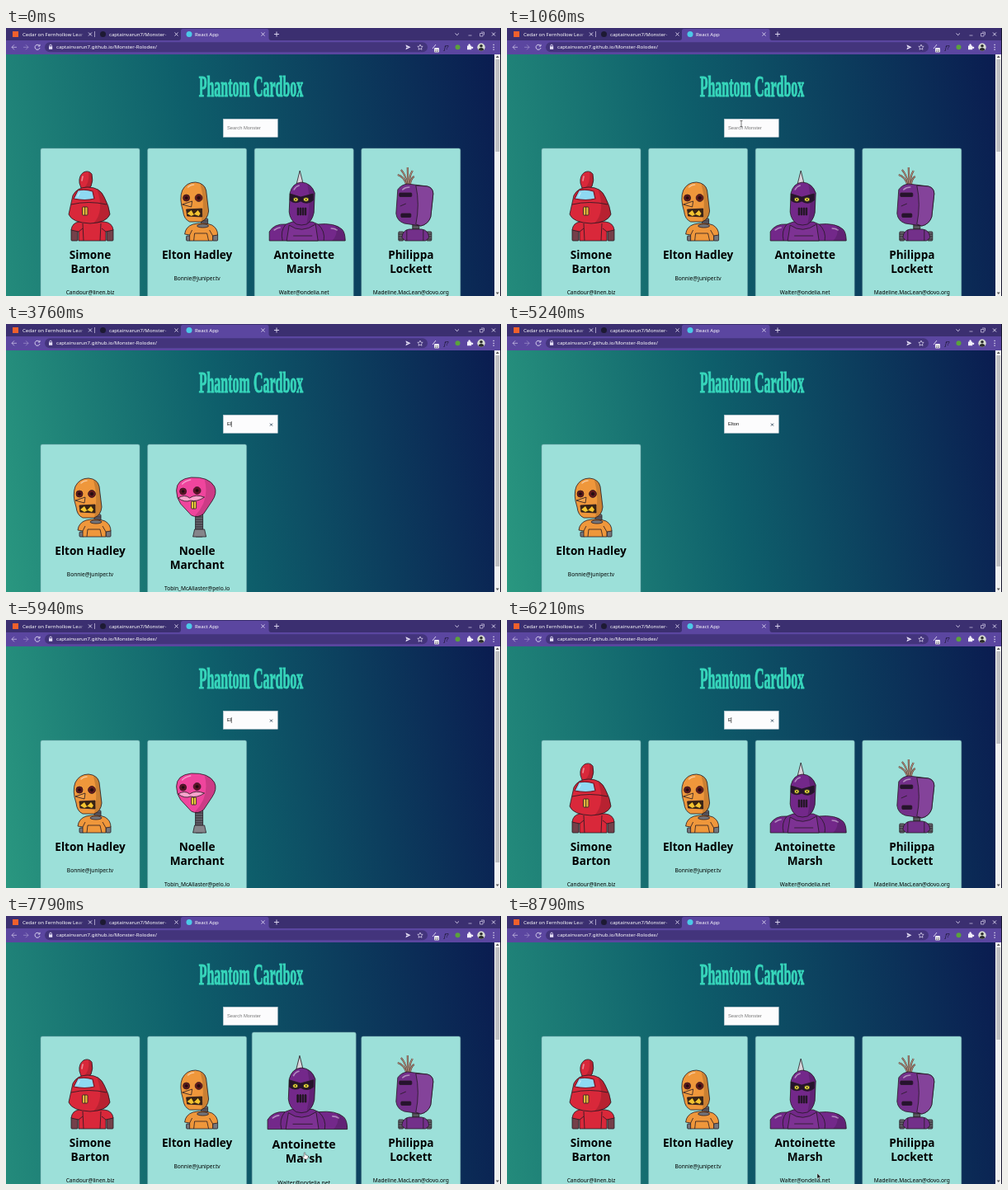
An HTML page that plays this animation: 600x325 px, repeating every 8850 ms.

```html
<!DOCTYPE html>
<html lang="en">
<head>
<meta charset="utf-8">
<title>React App</title>
<style>
html, body { margin: 0; width: 100%; height: 100%; overflow: hidden; background: #0a1c50; }
body { position: relative; }
#page { position: absolute; left: 0; top: 32px; width: 592px;
  background: linear-gradient(80deg, #2a9880, #0e5f6b 46%, #0a1c50); }
svg { position: absolute; left: 0; top: 0; }
text { font-family: "Noto Sans", "Open Sans", sans-serif; white-space: pre; }
.ui text { font-size: 6.1px; fill: #fff; }
.line { fill: none; stroke: #e4def5; stroke-width: .9; }
.field text { font: 5.8px "Liberation Sans", Arial, sans-serif; }
.title { font: bold 16px "Liberation Serif", serif; fill: #37d6bb; stroke: #37d6bb; stroke-width: .5; }
.card text { text-anchor: middle; }
.name { font-weight: bold; font-size: 13.6px; }
.mail { font-size: 6.6px; }
.bot { stroke: #241a22; stroke-width: .8; stroke-linejoin: round; }
</style>
</head>
<body>
<div id="page"></div>
<svg width="600" height="325" viewBox="0 0 600 325">
  <defs>
    <linearGradient id="fade"><stop offset="0" stop-color="#3b2f70" stop-opacity="0"/><stop offset="1" stop-color="#3b2f70"/></linearGradient>
  </defs>

  <text class="title" text-anchor="middle" transform="translate(297 83) scale(1 2.2)">Phantom Cardbox</text>
  <g class="field">
    <rect x="263.3" y="110.3" width="66" height="22" fill="#fcfcfd" stroke="#b9c6d0" stroke-width=".5"/>
    <text id="hint" x="268" y="123.3" fill="#777">Search Monster</text>
    <text id="typed" x="268" y="123.3" fill="#111"></text>
    <path id="clear" d="M320 120.6l3 3m0-3l-3 3" stroke="#2c4358" stroke-width=".9"/>
    <rect id="caret" y="118" width=".6" height="7" fill="#111"/>
  </g>
  <g id="cards"></g>

  <rect x="592" y="32" width="7" height="293" fill="#f1f1f1"/>
  <rect id="thumb" x="593.2" y="38" width="5" fill="#c0c0c2"/>
  <path d="M593.700 36l2-2.400 2 2.400zM593.700 320.500l2 2.400 2-2.400z" fill="#555"/>

  <g class="ui">
    <rect width="600" height="16" fill="#3b2f70"/>
    <rect y="15" width="600" height="17" fill="#5b46a0"/>
    <path d="M209 15q3 0 3-3V3.500q0-2.500 2.500-2.500H316q2.500 0 2.500 2.500V12q0 3 3 3z" fill="#5b46a0"/>
    <rect x="8" y="4" width="7" height="7" fill="#f0602c"/>
    <circle cx="117.500" cy="7.500" r="3.500" fill="#1d1a33"/>
    <circle cx="222" cy="7.500" r="3.500" fill="#4cc9e8"/>
    <text x="20" y="9.700">Cedar on Fernhollow Lear</text>
    <text x="125" y="9.700">captainvarun7/Monster-</text>
    <rect x="86" y="2" width="10" height="12" fill="url(#fade)"/>
    <rect x="191" y="2" width="10" height="12" fill="url(#fade)"/>
    <rect x="96" y="2" width="14" height="12" fill="#3b2f70"/>
    <rect x="201" y="2" width="9" height="12" fill="#3b2f70"/>
    <text x="229" y="9.700">React App</text>
    <path class="line" d="M100 5.500l4 4m0-4l-4 4M204.500 5.500l4 4m0-4l-4 4M309.500 5.500l4 4m0-4l-4 4M325 7.500h6m-3-3v6M544.500 6.500l2.200 2.200 2.200-2.200M589 5.500l4 4m0-4l-4 4"/>
    <path class="line" opacity=".7" d="M560.500 9h4M574.500 6.500h3.500v3.500h-3.500zM576 5h3.500v3.500M107.500 4v7"/>
    <rect x="47" y="17.300" width="464" height="12" rx="6" fill="#43347c"/>
    <path class="line" opacity=".7" d="M13 23.300H7m3-3l-3 3 3 3"/>
    <path class="line" opacity=".4" d="M21 23.300h6m-3-3l3 3-3 3"/>
    <path class="line" d="M40.500 21.500a3 3 0 1 0 .5 2.500M41 19.800v2.200h-2.200"/>
    <path class="line" d="M52.800 22.500v-1a1.300 1.300 0 0 1 2.600 0v1"/>
    <rect x="52" y="22.300" width="4.200" height="3.500" fill="#e4def5"/>
    <text x="61" y="25.400">captainvarun7.github.io/Monster-Rolodex/</text>
    <path d="M484.500 20.300l6 3-6 3 .6-2.500 3-.5-3-.5z" fill="#e4def5"/>
    <path class="line" style="stroke-width:.7" d="M502 20l.9 2.200 2.300.2-1.700 1.600.5 2.300-2-1.200-2 1.200.5-2.300-1.700-1.600 2.300-.2z"/>
    <path class="line" d="M517 25l4-5"/>
    <rect x="519" y="24" width="6" height="5.500" rx="1" fill="#ece9f5"/>
    <text x="519.600" y="28.500" style="font-size:4.200px;fill:#333">22</text>
    <text x="531" y="25.800" style="font-style:italic;font-size:7px;fill:#17132c">f?</text>
    <circle cx="547.500" cy="23.300" r="3" fill="#5aa23c"/>
    <path d="M559 21.500h1.600a1.300 1.300 0 1 1 2 0h1.600v1.500a1.200 1.200 0 1 1 0 1.600v1.700H559z" fill="#f4f1fc"/>
    <circle cx="576" cy="23.300" r="4.700" fill="#d8ddd2"/>
    <path d="M572.800 26.500q0-2.600 3.200-2.600t3.200 2.600q-3.200 2.400-6.400 0" fill="#2a2b2c"/>
    <circle cx="576" cy="21.800" r="1.800" fill="#2a2b2c"/>
    <path d="M590.500 19.800h1.200v1.200h-1.200zm0 2.900h1.200v1.200h-1.200zm0 2.900h1.200v1.200h-1.200z" fill="#f4f1fc"/>
  </g>
  <rect x="599" width="1" height="325" fill="#15132b"/>

  <g id="cursor">
    <path id="beam" d="M-1.500-3.500h3M0-3.500v7M-1.500 3.500h3" fill="none" stroke="#444" stroke-width=".7"/>
    <path id="arrow" d="M0 0v6.500l1.500-1.300 1 2.200 1-.5-1-2.100h2z" fill="#111" stroke="#fff" stroke-width=".4"/>
    <path id="hand" d="M-.8 0q.8-1 1.600 0v2.500l3 .8q.8.400.6 1.400l-.8 3h-4l-2.400-3.200q.4-1.200 2 0z" fill="#fff" stroke="#222" stroke-width=".5"/>
  </g>
</svg>
<script>
const LOOP = 8850;
const $ = id => document.getElementById(id);
const shape = (d, fill, extra = '') => `<path d="${d}" fill="${fill}" ${extra}/>`;
const disc = (x, y, rx, fill, ry = rx) => `<ellipse cx="${x}" cy="${y}" rx="${rx}" ry="${ry}" fill="${fill}"/>`;
const box = (x, y, w, h, fill, r = 1) => `<rect x="${x}" y="${y}" width="${w}" height="${h}" rx="${r}" fill="${fill}"/>`;
const ink = d => shape(d, 'none');
const shade = d => shape(d, '#000', 'opacity=".15" stroke="none"');
const shine = d => shape(d, 'none', 'stroke="#fff" stroke-opacity=".45" stroke-width="1.6" stroke-linecap="round"');
const neck = (x, y, w, h) => {
  let s = box(x, y, w, h, '#66666e');
  for (let i = 3; i < h; i += 3) s += ink(`M${x} ${y + i}h${w}`);
  return s;
};

const bots = {
  red: box(37, 98, 8, 14, '#74404a') + box(80, 98, 8, 14, '#74404a') +
    shape('M37 99Q38 90 47 89H77Q87 90 88 99L79 101V112H46V101z', '#d9283a') +
    ink('M51 91L52 112M73 91L72 112M46 101L51 97M79 101L74 97') +
    shape('M47 42Q46 33 52 29Q58 26 62 31Q64 39 61 46Q55 52 49 48z', '#d9283a') +
    shade('M58 28Q66 34 61 46Q55 52 51 49Q60 43 58 28') + shine('M51 34L50 39') +
    shape('M34 80Q37 66 39 57Q44 47 57 47Q72 47 77 59Q83 70 84 80Q80 90 60 91Q38 90 34 80z', '#d9283a') +
    shade('M68 49Q74 52 77 59Q83 70 84 80Q80 90 64 91Q78 76 68 49') +
    ink('M37 68Q58 63 80 68') +
    shape('M45 51Q54 49 63 52L65 61Q54 64 40 61z', '#8ed9f2', 'stroke="#7d1524" stroke-width="1.2"') + shine('M47 54L45 58') +
    box(50.5, 71, 6.5, 10, '#e6b63b') + ink('M53.7 71V81'),
  orange: neck(65, 85, 8, 9) + box(47, 106, 5, 6, '#77777c') + box(79, 104, 6, 8, '#77777c') +
    shape('M45 104Q46 95 55 92Q68 89 78 93Q85 97 85 105L79 106V112H51V105z', '#ef973b') +
    disc(67, 94, 7, '#77777c', 2) + ink('M51 105L54 99M79 106L75 99M56 112L57 103H72L74 112') +
    shape('M42 51Q47 41 58 41Q69 42 71 51L74 76Q73 86 65 89H51Q44 86 43 76Q38 61 42 51z', '#ef973b') +
    shade('M64 43Q70 45 71 51L74 76Q73 86 65 89Q70 66 64 43') + shine('M49 47Q52 44 56 44') +
    disc(47, 60, 4, '#6d1718') + disc(62, 60, 4.4, '#6d1718') +
    disc(47, 60, 1.8, '#2b0809') + disc(62, 60, 2, '#2b0809') +
    shape('M54 64L42 68L53 71z', '#f2a14a') +
    shape('M47 74L66 73V83L48 82z', '#3a2412') + shape('M48 79L53 75L56 80L61 75L64 79L62 82L57 80L53 82z', '#f4c430', 'stroke="none"'),
  violet: shape('M18 112V101Q24 91 38 92L46 89H70L77 92Q97 90 106 98Q110 102 110 112z', '#73288a') +
    shape('M42 93Q57 104 74 92L77 112H39z', '#7d3293') +
    ink('M38 92Q31 100 34 112M77 92Q86 100 84 112M47 106H70') + shine('M24 99Q28 96 31 96M93 97Q97 97 100 99') +
    shade('M98 94Q110 98 110 112H94Q102 104 98 94') +
    shape('M51 43L55 27L59 43z', '#d9d5db') +
    shape('M43 54Q46 42 57 41Q69 42 73 54L72 78Q70 88 63 92Q57 94 51 92Q43 87 42 77z', '#73288a') +
    shade('M64 43Q71 47 73 54L72 78Q70 88 63 92Q69 66 64 43') + shine('M48 50Q50 46 54 45') +
    shape('M43 55L56 59L71 55V63Q64 69 56 64Q49 68 43 63z', '#26132d') +
    disc(50, 62, 3, '#f5e63c', 2.4) + disc(62.5, 62, 3.3, '#f5e63c', 2.4) +
    disc(50, 62, .6, '#111') + disc(62.5, 62, .6, '#111') +
    [52, 55, 58, 61].map(x => box(x, 72, 1.6, 9, '#1d1020', .5)).join(''),
  plum: neck(62, 91, 8, 9) + neck(45, 101, 6, 11) + neck(79, 101, 6, 11) +
    shape('M49 108Q50 99 58 98H73Q81 99 82 108L78 112H53z', '#73308a') + ink('M55 99V112M75 99V112') +
    ['M55 44Q51 34 44 32', 'M56 44Q53 31 48 26', 'M57 44Q56 30 56 23', 'M58 44Q58 33 62 27', 'M59 44Q60 36 64 34']
      .map(d => shape(d, 'none', 'stroke="#5d4540" stroke-width="2.200"') + shape(d, 'none', 'stroke="#d3a78d"')).join('') +
    shape('M44 50Q48 44 56 43L80 46Q87 48 87 55L84 83Q81 92 72 94L52 91Q43 88 42 79z', '#73308a') +
    shape('M66 45L80 46Q87 48 87 55L84 83Q81 92 72 94L66 92Q71 68 66 45z', '#84439a') + shine('M50 50Q53 47 58 47') +
    box(46, 54, 15, 4.5, '#27122f') + box(48, 79, 12, 4.5, '#27122f') + ink('M47 70L54 67'),
  pink: neck(58, 82, 9, 30) + shape('M55 112L57 103H69L71 112z', '#85858a') +
    shape('M35 56Q35 42 53 40Q74 39 81 51Q85 59 78 69L68 84Q61 90 53 86L40 72Q35 65 35 56z', '#ef459d') +
    shade('M69 42Q79 45 81 51Q85 59 78 69L68 84Q61 90 57 87Q76 68 69 42') + shine('M42 48Q46 44 52 43') +
    disc(43, 57, 4, '#671025') + disc(60, 56, 4.4, '#671025') + disc(43, 57, 1.6, '#22040b') + disc(60, 56, 1.8, '#22040b') +
    shape('M37 65Q45 60 51 65Q58 60 69 64Q60 70 52 68Q45 71 37 65z', '#f9a4cd') +
    box(53, 69, 6, 9, '#f3cf3a') + ink('M56 69V78')
};

// [name lines, mail, robot]
const people = [
  ['Simone|Barton', 'Candour@linen.biz', 'red'],
  ['Elton Hadley', 'Bonnie@juniper.tv', 'orange'],
  ['Antoinette|Marsh', 'Walter@ondelia.net', 'violet'],
  ['Philippa|Lockett', 'Madeline.MacLean@dovo.org', 'plum'],
  ['Noelle|Marchant', 'Tobin_McAllaster@pelo.io', 'pink']
];
$('cards').innerHTML = people.map(([name, mail, bot]) => {
  const lines = name.split('|');
  return `<g class="card"><rect width="120" height="200" rx="2" fill="#9ce0d9" stroke="#719fa4" stroke-width=".5"/>
    <g class="bot">${bots[bot]}</g>
    ${lines.map((s, i) => `<text class="name" x="60" y="${134 + 16.5 * i}">${s}</text>`).join('')}
    <text class="mail" x="60" y="${143.5 + 16.5 * lines.length}">${mail}</text></g>`;
}).join('');
const cards = [...$('cards').children];

const typing = [[0, ''], [3270, 'E'], [3760, 'El'], [4270, 'Elt'], [4420, 'Elto'], [4670, 'Elton'],
  [5390, 'Elto'], [5610, 'Elt'], [5850, 'El'], [6210, 'E'], [6420, '']];
const caretOn = [[1700, 2210], [2790, 5240], [5390, 7000]];
// pointer paths as [time, x, y]
const paths = [
  [[390, 500, 322], [550, 484, 237], [730, 484, 237], [1060, 284, 116], [1420, 284, 116], [1700, 283, 121.5], [3270, 283, 121.5]],
  [[7000, 283, 121.5], [7450, 283, 121.5], [7580, 338, 205], [7790, 362, 287], [8000, 368, 326]],
  [[8790, 376, 312], [LOOP, 376, 312]]
];

const show = (el, on) => el.style.display = on ? '' : 'none';
const easeOut = u => 1 - (1 - Math.min(1, Math.max(0, u))) ** 2;

function pointer(t) {
  const path = paths.find(p => t >= p[0][0] && t < p[p.length - 1][0]);
  if (!path) return null;
  const i = path.findIndex(p => p[0] > t);
  const [t0, x0, y0] = path[i - 1], [t1, x1, y1] = path[i];
  const u = (t - t0) / (t1 - t0);
  return [x0 + (x1 - x0) * u, y0 + (y1 - y0) * u];
}

function draw(t) {
  const query = typing.filter(k => k[0] <= t).pop()[1];
  $('typed').textContent = query;
  show($('hint'), !query);
  show($('clear'), query);
  show($('caret'), caretOn.some(([a, b]) => t >= a && t < b));
  $('caret').setAttribute('x', 267.7 + (query ? $('typed').getComputedTextLength() : 0));

  const hover = easeOut((t - 7500) / 250) - easeOut((t - 8000) / 240);
  let slot = 0;
  cards.forEach((card, i) => {
    const match = people[i][0].toLowerCase().includes(query.toLowerCase()) && slot < 4;
    show(card, match);
    if (!match) return;
    const scale = i === 2 ? 1 + .05 * hover : 1;
    card.setAttribute('transform', `translate(${102 + 129.6 * slot++} 246) scale(${scale}) translate(-60 -100)`);
  });
  const tall = slot > 2;
  $('page').style.height = (tall ? 732 : 320) + 'px';
  $('thumb').setAttribute('height', tall ? 112 : 256);

  const at = pointer(t);
  show($('cursor'), at);
  if (!at) return;
  const [x, y] = at;
  const kind = y < 133 && x < 330 ? 'beam' : y > 146 && t < 8700 ? 'hand' : 'arrow';
  ['beam', 'hand', 'arrow'].forEach(k => show($(k), k === kind));
  $('cursor').setAttribute('transform', `translate(${x} ${y})`);
}

const start = performance.now();
function tick() {
  draw((performance.now() - start) % LOOP);
  requestAnimationFrame(tick);
}
tick();
</script>
</body>
</html>
```
